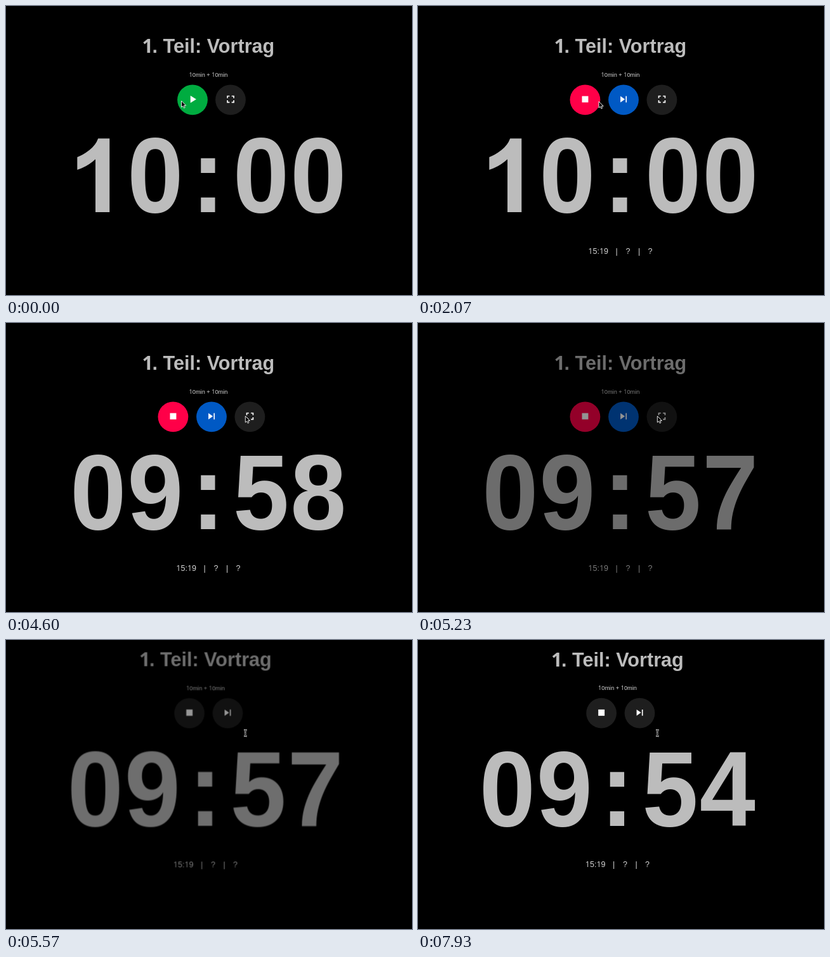
An HTML page for the animation above (8530 ms loop, 640x457 px).

```html
<!DOCTYPE html>
<html lang="de">
<head>
<meta charset="utf-8">
<title>Timer</title>
<style>
  html, body { margin: 0; height: 100%; overflow: hidden; background: #000; }
  svg { display: block; width: 640px; height: 457px; }
  text { font-family: "Liberation Sans", Arial, sans-serif; white-space: pre; }
  #ui { fill: #bcbcbc; }
  .one { font-family: "Open Sans", "Noto Sans", sans-serif; }
  .title { font-size: 30.6px; font-weight: bold; }
  .plan { font-size: 9.2px; text-anchor: middle; fill: #d6d6d6; }
  .clock { font-size: 158.5px; font-weight: bold; }
  .digits { letter-spacing: 2px; }
  .info { font-size: 12.5px; fill: #d6d6d6; }
  .mid { text-anchor: middle; }
  .icon { fill: #fff; }
</style>
</head>
<body>
<svg viewBox="0 0 640 457">
  <g id="ui">
    <text class="title" y="74.2"><tspan class="one" x="214.4">1</tspan><tspan x="230.6">. Teil: Vortrag</tspan></text>
    <text class="plan" x="319" y="111.5"><tspan class="one">1</tspan>0min + <tspan class="one">1</tspan>0min</text>

    <g id="buttons"></g>

    <g class="clock">
      <path id="ten" transform="translate(99.5 326) scale(.0791 -.0791)"
        d="M806 0H525V1059Q371 915 162 846V1101Q272 1137 401 1237.5T578 1472H806Z"/>
      <g transform="translate(0 326.2) scale(1 1.068)">
        <text id="minutes" class="digits" x="281.5" text-anchor="end"></text>
        <text class="mid" x="318.3">:</text>
        <text id="seconds" class="digits" x="358"></text>
      </g>
    </g>

    <g id="info" class="info">
      <text x="268.3" y="392"><tspan class="one">1</tspan>5:<tspan class="one">1</tspan>9</text>
      <g class="mid">
        <text x="313" y="392">|</text><text x="331" y="392">?</text>
        <text x="348.5" y="392">|</text><text x="366" y="392">?</text>
      </g>
    </g>
  </g>

  <g id="cursor">
    <path id="arrow" d="M0 0V10L2.3 8 3.9 11.3 5.6 10.5 4.1 7.3H7.2Z" fill="#000" stroke="#fff" stroke-width=".9"/>
    <g id="beam" fill="none">
      <path stroke="#ddd" stroke-width="2.2" d="M-2.3-5Q0-5 0-3Q0-5 2.3-5M0-4V4M-2.3 5Q0 5 0 3Q0 5 2.3 5M-1.2 1H1.2"/>
      <path stroke="#000" stroke-width=".8" d="M-2-5Q0-5 0-3Q0-5 2-5M0-4V4M-2 5Q0 5 0 3Q0 5 2 5M-1 1H1"/>
    </g>
  </g>
</svg>
<script>
const LOOP = 8530, START = 740, FULLSCREEN = 5440, FIRST_TICK = 2870;
const SHIFT = { x: -4.5, y: -32.6 };
const DARK = '#1e1e1e';
const $ = id => document.getElementById(id);
const clamp = v => Math.max(0, Math.min(1, v));
const show = (el, on) => el.setAttribute('display', on ? 'inline' : 'none');

const ICONS = {
  play: 'M8 5v14l11-7z',
  stop: 'M6 6h12v12H6z',
  skip: 'M6 18l8.5-6L6 6v12zM16 6v12h2V6h-2z',
  full: 'M7 14H5v5h5v-2H7v-3zm-2-4h2V7h3V5H5v5zm12 7h-3v2h5v-5h-2v3zM14 5v2h3v3h2V5h-5z'
};

// Button rows: [icon, centre x, colour]
const ROWS = {
  ready: [['play', 294, '#00ac40'], ['full', 354, DARK]],
  running: [['stop', 263.4, '#ff0048'], ['skip', 324, '#0059c4'], ['full', 384.4, DARK]],
  fullscreen: [['stop', 293.6, DARK], ['skip', 354, DARK]]
};

const button = ([icon, x, color]) => `
  <g transform="translate(${x} 148.3)">
    <circle r="23.9" fill="${color}"/>
    <circle class="glow" r="23.9" fill="#fff" opacity="0"/>
    <path class="icon" transform="translate(-9.9 -10.8) scale(.83)" d="${ICONS[icon]}"/>
  </g>`;

$('buttons').innerHTML = Object.entries(ROWS)
  .map(([name, row]) => `<g id="${name}">${row.map(button).join('')}</g>`).join('');
const playGlow = document.querySelector('#ready .glow');
const stopGlow = document.querySelector('#running .glow');

// Pointer path: [time, x, y]
const PATH = [
  [30, 276.5, 150], [270, 285, 151], [2940, 285, 151], [3600, 298, 182.5],
  [3740, 298, 182.5], [4600, 377.3, 147.2], [LOOP, 377.3, 147.2]
];

function pointer(t) {
  const i = PATH.findIndex(p => t < p[0]);
  if (i < 1) return PATH[0].slice(1);
  const [t0, x0, y0] = PATH[i - 1], [t1, x1, y1] = PATH[i];
  const k = (t - t0) / (t1 - t0), e = k * k * (3 - 2 * k);
  return [x0 + (x1 - x0) * e, y0 + (y1 - y0) * e];
}

function draw(t) {
  const full = t >= FULLSCREEN;
  const state = full ? 'fullscreen' : t >= START ? 'running' : 'ready';
  for (const name in ROWS) show($(name), name === state);
  show($('info'), t >= START);

  const hover = .05 * clamp((t - 30) / 240);
  playGlow.setAttribute('opacity', hover + .15 * clamp((t - 600) / 140));
  stopGlow.setAttribute('opacity', .2 * clamp((1100 - t) / 360));

  const left = 600 - Math.max(0, Math.floor((t - FIRST_TICK) / 1000) + 1);
  show($('ten'), left === 600);
  $('minutes').textContent = left === 600 ? '0' : '09';
  $('seconds').textContent = String(left % 60).padStart(2, '0');

  // Fade through black while the window goes fullscreen
  const light = full ? (t - 5430) / 238 : 1 - (t - 5070) / 380;
  $('ui').setAttribute('opacity', clamp(light));
  $('ui').setAttribute('transform', full ? `translate(${SHIFT.x} ${SHIFT.y})` : '');

  const [x, y] = pointer(t);
  const overText = y > 174 + (full ? SHIFT.y : 0);
  $('cursor').setAttribute('transform', `translate(${x} ${y})`);
  show($('arrow'), !overText);
  show($('beam'), overText);
}

let begin;
function tick(now) {
  begin ??= now;
  draw((now - begin) % LOOP);
  requestAnimationFrame(tick);
}
draw(0);
requestAnimationFrame(tick);
</script>
</body>
</html>
```
